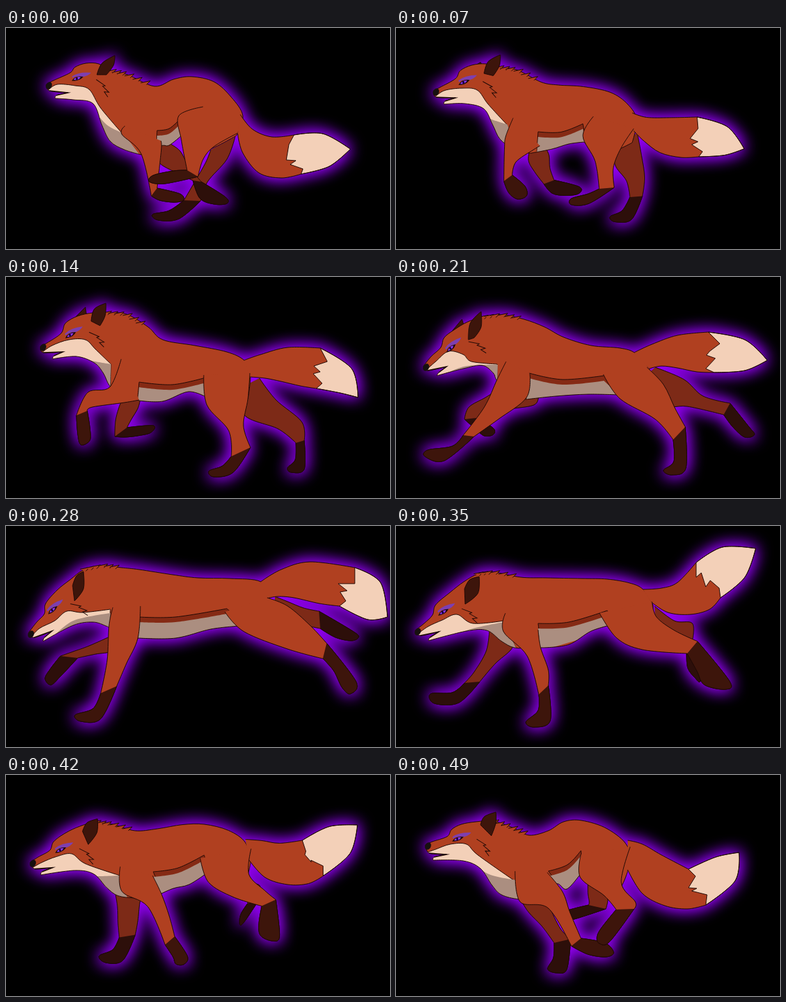
Write an HTML page with a canvas that moves like this. It is 600 px wide and 345 px high and loops after 560 ms.

```html
<!DOCTYPE html>
<html lang="en">
<head>
<meta charset="utf-8">
<title>Running fox</title>
<style>
html, body { margin: 0; width: 100%; height: 100%; overflow: hidden; background: #000; }
canvas { display: block; }
</style>
</head>
<body>
<canvas id="stage" width="600" height="345"></canvas>
<script>
const STEP = 70;
const COLOR = {
  fur: '#b04020', farFur: '#7d2a17', shade: '#852a14', sock: '#3d150b', farSock: '#2d0f0a',
  cream: '#f3d0b8', tan: '#ab8e80', line: '#1c0805', glow: '#9200f4'
};

// Outlines are "x y" pairs; "!" marks a sharp corner.
const keyPoses = [
  {
    body: '63 88! 74 82 100 70 108 61 125 55 145 56 164 67 190 73 232 91 262 80 290 76 325 84 352 108 370 137 360 168! 300 195 274 168! 255 183 242 184 212 198! 185 190 163 177 150 152 136 118 105 112 77 110! 79 105 97 101! 68 98',
    tail: '366 135! 385 158 415 170 450 167! 495 165 538 189! 505 216 461 228! 430 234 395 226 370 195 362 165!',
    tailEdge: '464 220 444 213 453 207 438 206 442 182',
    foreleg: '186 153! 181 166 211 196 227 262! 240 269 262 272 277 269 272 259 236 250! 240 215 243 185 242 176!',
    hindleg: '308 123! 270 137 274 175 283 222! 262 223 230 230 224 240 248 243 300 232! 308 205 325 185 362 164!',
    farForeleg: '238 180! 238 208 262 224 292 238! 303 266 325 275 345 274 343 264 305 240! 285 215 272 192 255 180!',
    farHindleg: '320 190! 312 210 295 240 278 269! 255 285 229 291 238 300 270 298 304 270! 315 240 345 205 358 170!',
    throat: '66 97! 80 88 108 90 130 96 148 125 182 165! 210 205! 140 190! 75 120!',
    chest: '147 140! 160 153 184 165! 212 202! 150 185!',
    belly: '236 168! 255 165 272 150! 280 190! 235 195!',
    ear: '142 73! 150 55 170 43! 168 58 157 73!',
    farEar: '128 60! 140 60! 150 62!',
    eye: '110 78 132 74'
  },
  {
    body: '54 108! 64 103 86 88 93 72 112 61 135 56 156 56 188 58 222 78 245 98 295 107 345 117 372 130 382 150 378 190! 345 200 314 188! 285 179 245 194 208 193! 180 185 162 170 152 150 138 134 110 124 73 128! 75 123 89 117! 58 118',
    tail: '372 130! 398 121 440 110 491 111! 540 143 550 188! 522 181 485 174! 460 170 430 163 405 158 381 156!',
    tailEdge: '494 166 480 151 491 148 481 139 502 132',
    foreleg: '180 128! 162 172 128 180 110 216! 112 245 117 262 131 255 131 235 127 209! 135 203 185 196 208 192!',
    hindleg: '309 153! 314 200 348 240 352 280! 338 295 317 303 325 312 355 305 382 266! 371 232 378 190 381 150!',
    farForeleg: '182 190! 176 205 171 225 170 249! 185 250 205 248 226 243 230 232 189 235! 196 222 206 205 210 190!',
    farHindleg: '372 170! 372 215 425 237 453 259! 452 285 440 298 446 305 466 300 466 255! 462 226 422 192 396 158!',
    throat: '56 118! 72 107 98 98 124 98 140 113 164 136! 163 175! 130 170! 70 135!',
    chest: '108 123! 135 131 164 136! 163 175! 120 150!',
    belly: '208 172! 260 176 312 165! 318 200! 205 205!',
    ear: '133 69! 138 50 156 41! 155 60 147 76!',
    farEar: '105 66! 124 47! 126 62!',
    eye: '99 90 119 82'
  },
  {
    body: '43 139! 55 124 70 110 75 95 90 83 112 70 135 63 165 59 200 66 232 78 262 94 305 107 350 111 374 119 396 143! 390 180 348 184! 300 183 250 186 204 191! 180 185 158 162 152 150 135 138 105 143 64 154! 67 149 79 140! 49 146',
    tail: '372 118! 400 105 440 91 488 86! 545 98 580 130! 545 146 497 149! 470 148 440 142 415 139 396 143!',
    tailEdge: '484 143 499 127 485 122 490 116 506 104',
    foreleg: '172 132! 158 160 138 203 105 247! 88 264 50 270 45 280 75 287 122 249! 160 222 204 188 209 150!',
    hindleg: '324 152! 350 190 405 222 433 254! 434 288 418 302 432 309 453 298 452 234! 436 205 418 168 392 141!',
    farForeleg: '160 175! 140 188 114 203 107 222! 125 238 138 248 152 246 152 236 126 220! 165 208 215 200 222 185!',
    farHindleg: '395 150! 410 200 455 202 512 215! 527 235 545 250 560 246 550 232 522 197! 480 186 450 160 405 141!',
    throat: '45 147! 62 132 82 116 105 121 118 132 158 136! 158 168! 120 165! 60 160!',
    chest: '80 150! 110 139 159 137! 158 168! 110 160!',
    belly: '208 158! 260 168 325 162! 360 195! 203 198!',
    ear: '113 98! 116 72 133 54! 133 78 122 95!',
    farEar: '88 84! 103 66! 106 75!',
    eye: '84 111 102 99'
  },
  {
    body: '35 167! 48 150 60 137 62 121 80 100 100 84 122 68 150 62 180 65 208 68 260 76 300 81 350 82 398 87 412 113! 405 160 366 156! 320 161 265 175 208 175! 185 175 163 160 156 156 136 150 105 155 58 180! 60 174 72 164! 44 174',
    tail: '398 87! 430 68 475 56 545 65! 585 88 596 142! 565 146 521 125! 490 121 450 112 425 110 408 113!',
    tailEdge: '531 117 522 103 533 101 519 90 545 90',
    foreleg: '167 127! 161 155 158 210 148 261! 136 285 108 295 117 305 148 301 173 250! 188 215 206 175 210 125!',
    hindleg: '342 134! 372 165 440 192 495 207! 512 226 525 252 538 262 547 243 501 183! 475 155 440 125 408 112!',
    farForeleg: '168 170! 130 187 105 196 85 203! 70 222 61 238 70 248 84 236 112 206! 140 200 165 196 175 185!',
    farHindleg: '420 140! 430 148 455 153 491 160! 515 174 540 179 551 173 540 163 489 133! 465 128 440 118 420 110!',
    throat: '38 175! 52 160 76 148 95 133 120 135 163 130! 162 162! 110 170! 50 190!',
    chest: '72 175! 105 148 163 136! 162 162! 110 165!',
    belly: '208 150! 265 150 345 137! 372 160! 206 185!',
    ear: '104 93! 110 78 121 71! 121 98 107 117!',
    farEar: '90 95! 100 88! 105 90!',
    eye: '71 131 88 120'
  },
  {
    body: '30 163! 44 152 57 139 62 123 84 104 106 87 128 75 152 72 195 80 235 81 290 82 330 83 365 89 386 99 402 124! 390 170 338 154! 305 164 270 185 230 190! 210 190 185 190 165 180 142 163 110 164 51 179! 53 174 67 165! 38 171',
    tail: '386 99! 415 97 440 88 469 57! 510 33 562 35! 545 80 507 112! 490 130 460 138 425 135 398 118!',
    tailEdge: '505 97 491 85 484 95 477 73 469 80',
    foreleg: '171 136! 168 165 205 203 223 263! 222 288 203 306 216 314 241 304 238 249! 238 225 226 190 222 162!',
    hindleg: '318 136! 345 175 385 193 455 199! 470 226 482 248 515 255 521 242 471 180! 435 163 407 142 400 118!',
    farForeleg: '146 162! 141 195 122 228 107 245! 88 260 54 262 60 277 98 276 131 243! 155 215 178 195 186 182!',
    farHindleg: '405 150! 430 175 450 185 454 198! 456 222 468 238 475 243 475 225 463 180! 463 152 435 148 404 125!',
    throat: '32 170! 50 157 72 147 95 138 120 152 168 148! 188 192! 120 190! 45 185!',
    chest: '85 172! 120 160 168 150! 190 195! 120 185!',
    belly: '222 160! 270 158 330 140! 345 160! 226 195!',
    ear: '107 98! 115 84 130 79! 128 105 108 122!',
    farEar: '95 98! 105 92! 110 95!',
    eye: '72 134 90 126'
  },
  {
    body: '46 109! 57 104 80 96 87 85 102 77 125 73 152 72 182 82 208 94 238 87 262 73 290 71 330 84 362 112 362 150! 340 185 290 152! 267 178 250 170 225 195! 192 194 165 187 150 172 132 146 105 134 58 133! 60 128 79 124! 52 122',
    tail: '362 102! 385 108 415 125 457 147! 500 128 536 121! 530 165 484 203! 455 209 420 204 385 185 362 148!',
    tailEdge: '486 187 462 181 470 177 457 176 468 158',
    foreleg: '186 150! 194 198 238 208 274 267! 300 280 328 284 340 277 326 262 289 255! 272 215 260 182 236 152!',
    hindleg: '289 124! 288 160 325 188 344 210! 320 240 314 254 318 263 334 260 372 209! 374 198 352 168 366 112!',
    farForeleg: '192 190! 207 214 228 236 247 262! 246 285 237 303 252 309 267 303 273 256! 257 240 240 205 240 190!',
    farHindleg: '300 160! 300 185 302 198 301 203! 280 208 262 214 258 226 275 226 328 209! 331 195 328 185 345 180!',
    throat: '48 121! 62 116 85 108 110 108 128 125 185 165! 192 200! 130 180! 55 140!',
    chest: '118 138! 148 156 188 164! 194 202! 130 180!',
    belly: '238 158! 268 148 289 126! 292 160! 262 190!',
    ear: '132 78! 138 65 156 58! 156 75 149 95!',
    farEar: '110 80! 125 78! 130 80!',
    eye: '95 99 117 94'
  }
].map(pose => mapParts(pose, parsePoints));

function mapParts(pose, fn) {
  return Object.fromEntries(Object.entries(pose).map(([name, part]) => [name, fn(part, name)]));
}

function parsePoints(text) {
  return [...text.matchAll(/(\d+) (\d+)(!?)/g)].map(m => ({ x: +m[1], y: +m[2], corner: m[3] === '!' }));
}

function halfway(a, b) {
  return mapParts(a, (part, name) => part.map((p, i) => {
    const q = b[name][i];
    return { x: (p.x + q.x) / 2, y: (p.y + q.y) / 2, corner: p.corner };
  }));
}

const [gather, reach, stretch, fly, land, fold] = keyPoses;
const cycle = [gather, halfway(gather, reach), reach, stretch, fly, land, halfway(land, fold), fold];

const stage = document.getElementById('stage').getContext('2d');
const layer = document.createElement('canvas');
layer.width = 600;
layer.height = 345;
const pen = layer.getContext('2d');

// Smooth path through points from index `first` to `last`; wraps when last equals the length.
function curve(points, first = 0, last = points.length) {
  const at = i => points[(i + points.length) % points.length];
  const handle = (i, side) => {
    const p = at(i), a = at(i - 1), b = at(i + 1), k = p.corner ? 0 : side / 6;
    return [p.x + (b.x - a.x) * k, p.y + (b.y - a.y) * k];
  };
  const path = new Path2D();
  path.moveTo(at(first).x, at(first).y);
  for (let i = first; i < last; i++) {
    path.bezierCurveTo(...handle(i, 1), ...handle(i + 1, -1), at(i + 1).x, at(i + 1).y);
  }
  return path;
}

function polyline(points) {
  const path = new Path2D();
  points.forEach(p => path.lineTo(p.x, p.y));
  return path;
}

function fill(path, color) {
  pen.fillStyle = color;
  pen.fill(path);
}

function outline(path, width = 1) {
  pen.lineWidth = width;
  pen.strokeStyle = COLOR.line;
  pen.stroke(path);
}

function paint(path, color) {
  fill(path, color);
  outline(path);
}

function drawLeg(points, fur, sock) {
  paint(curve(points, 0, points.length - 1), fur);
  paint(curve(points, 3, 8), sock);
}

function drawTail({ tail, tailEdge }) {
  const shape = curve(tail, 0, tail.length - 1);
  fill(shape, COLOR.fur);
  const tip = curve(tail, 3, 7);
  tailEdge.forEach(p => tip.lineTo(p.x, p.y));
  tip.closePath();
  paint(tip, COLOR.cream);
  outline(shape);
}

function drawBody(pose) {
  const body = curve(pose.body);
  fill(body, COLOR.fur);
  pen.save();
  pen.clip(body);
  const belly = curve(pose.belly);
  pen.translate(0, -8);
  paint(belly, COLOR.shade);
  pen.translate(0, 8);
  fill(belly, COLOR.tan);
  paint(curve(pose.throat), COLOR.cream);
  fill(curve(pose.chest), COLOR.tan);
  pen.restore();
  outline(body);
}

function drawNape(body) {
  for (let i = 6; i < 8; i++) {
    for (const k of [0.1, 0.4, 0.7]) {
      const x = body[i].x + (body[i + 1].x - body[i].x) * k;
      const y = body[i].y + (body[i + 1].y - body[i].y) * k;
      paint(polyline([{ x: x - 9, y: y }, { x: x + 6, y: y - 3 }, { x: x, y: y + 3 }]), COLOR.fur);
    }
  }
}

function drawFace({ body, eye: [eye, lidEnd] }) {
  const nose = new Path2D();
  nose.ellipse(body[0].x + 4, body[0].y + 2, 4.5, 6, 0.5, 0, 7);
  fill(nose, '#17100f');
  const [chin, corner, lip] = body.slice(26);
  outline(polyline([chin, corner, lip]), 1.5);

  pen.save();
  pen.translate(eye.x, eye.y);
  pen.rotate(Math.atan2(lidEnd.y - eye.y, lidEnd.x - eye.x));
  fill(new Path2D('M-6-4Q6-9 24-4Q18 1 8 0Q0-4-6-1Z'), '#7d3fb0');
  fill(new Path2D('M-8 3Q-1-5 11 0Q5 5-3 4Z'), COLOR.line);
  fill(new Path2D('M-5 2Q0-3 7 0Q3 4-2 3Z'), '#8a35ef');
  fill(new Path2D('M-1-1h3v4h-3Z'), '#180040');
  outline(new Path2D('M30 8L42 20L38 20L46 31L39 29L43 38'));
  pen.restore();
}

function drawFox(pose) {
  pen.clearRect(0, 0, 600, 345);
  drawLeg(pose.farHindleg, COLOR.farFur, COLOR.farSock);
  drawLeg(pose.farForeleg, COLOR.farFur, COLOR.farSock);
  paint(curve(pose.farEar), COLOR.sock);
  drawBody(pose);
  drawTail(pose);
  drawNape(pose.body);
  paint(curve(pose.ear), COLOR.sock);
  drawFace(pose);
  drawLeg(pose.foreleg, COLOR.fur, COLOR.sock);
  drawLeg(pose.hindleg, COLOR.fur, COLOR.sock);
}

function render(pose) {
  drawFox(pose);
  stage.shadowBlur = 0;
  stage.fillStyle = '#000';
  stage.fillRect(0, 0, 600, 345);
  stage.shadowColor = COLOR.glow;
  stage.shadowBlur = 26;
  stage.drawImage(layer, 0, 0);
  stage.drawImage(layer, 0, 0);
}

let shown = -1;
const start = performance.now();
function tick() {
  const index = Math.floor((performance.now() - start) / STEP) % cycle.length;
  if (index !== shown) render(cycle[shown = index]);
  requestAnimationFrame(tick);
}
tick();
</script>
</body>
</html>
```
